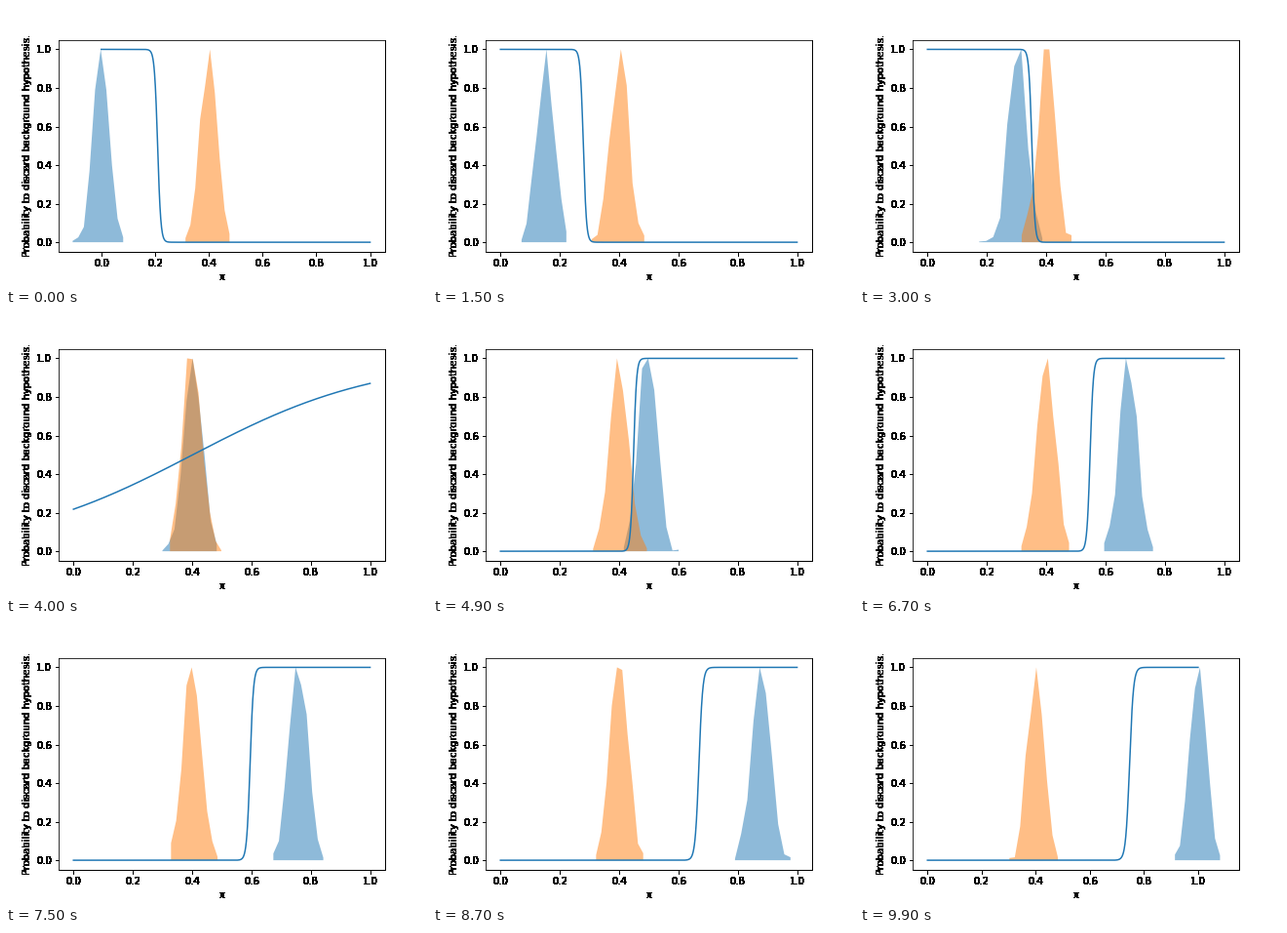
Recreate the animation shown at these times as a matplotlib script. Size 432x288 px, loop 10 s.

```python
import numpy as np
import matplotlib.pyplot as plt
from matplotlib.animation import FuncAnimation

FRAMES = 100
BINS = 10
SAMPLES = 1000
SIGMA = 0.03
REF = 0.4  # centre of the fixed distribution
REACH_LEFT, REACH_RIGHT = 0.1035, 0.096  # view kept around the moving one


def solid(img, dpi):
    """Turn every covered pixel into opaque black."""
    out = np.zeros_like(img)
    out[..., 3] = img[..., 3] > 0
    return out, 0, 0


def histogram(rng, mean):
    """Bin centres and peak-normalised counts of a normal sample."""
    counts, edges = np.histogram(rng.normal(mean, SIGMA, SAMPLES), BINS)
    return (edges[:-1] + edges[1:]) / 2, counts / counts.max()


def classifier(x, mean):
    """Sigmoid between the two centres, flat where they coincide."""
    d = mean - REF
    mid = REF + d / 2 + (0.13 if d > 0 else 0.06) * d**2
    slope = (230 - 150 * abs(d)) * np.tanh((abs(d) / 0.07) ** 1.5)
    return 0.5 * (1 + np.tanh(np.sign(d) * slope * (x - mid) / 2))


fig = plt.figure(figsize=(6, 4), dpi=72, facecolor="white")
ax = fig.add_axes([0.125, 0.125, 0.775, 0.755])
ax.set_xlabel("x")
ax.set_ylabel("Probability to discard background hypothesis.")
ax.set_ylim(-0.05, 1.05)
for part in (ax.xaxis, ax.yaxis, ax.spines["bottom"], ax.spines["right"]):
    part.set_agg_filter(solid)

grid = np.linspace(0, 1, 1000)
line, = ax.plot(grid, grid, color="C0", lw=1.5)
areas = [ax.fill([0, 1, 1], [0, 0, 1], color=c, alpha=0.5, lw=0)[0]
         for c in ("C0", "C1")]


def update(i):
    rng = np.random.default_rng(i)
    mean = i / (FRAMES - 1)
    for area, mu in zip(areas, (mean, REF)):
        x, h = histogram(rng, mu)
        area.set_xy(np.column_stack([np.r_[x[0], x, x[-1]], np.r_[0, h, 0]]))
    line.set_ydata(classifier(grid, mean))
    lo, hi = min(0, mean - REACH_LEFT), max(1, mean + REACH_RIGHT)
    pad = 0.05 * (hi - lo)
    ax.set_xlim(lo - pad, hi + pad)
    return [*areas, line]


anim = FuncAnimation(fig, update, frames=FRAMES, interval=100, repeat=True)
plt.show()
```
